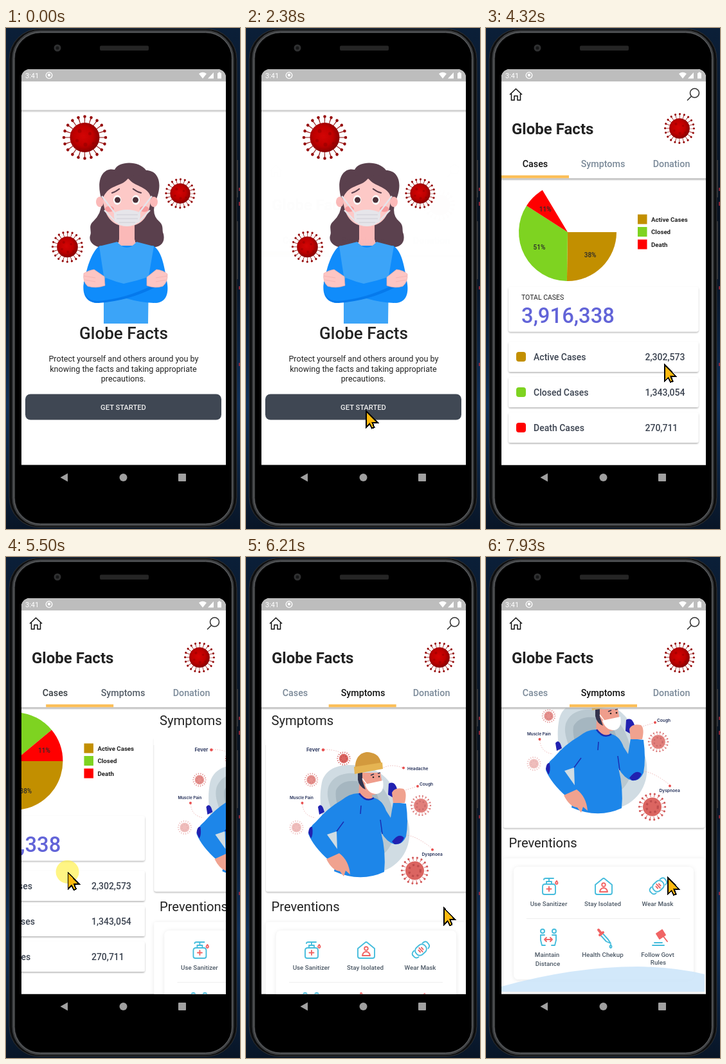
Animation of 364 by 778 pixels, one loop 8 s. Source, as an HTML page:

```html
<!DOCTYPE html>
<html lang="en">
<head>
<meta charset="utf-8">
<title>Health stats app</title>
<style>
html, body { margin: 0; width: 100%; height: 100%; overflow: hidden; background: #0a1b30; }
svg { display: block; width: 100vw; height: 100vh; }
text { font-family: Roboto, sans-serif; fill: #222; }
.mid { text-anchor: middle; }
.tab { font-size: 14.3px; font-weight: 500; text-anchor: middle; }
.legend { font-size: 9.7px; font-weight: 700; }
.share { font-size: 10px; font-weight: 500; text-anchor: middle; fill: #2b2b2b; }
.row text { font-size: 14px; font-weight: 500; fill: #3b4350; }
.card { fill: #fff; filter: url(#shade); }
.head { font-size: 20.2px; }
.tip text { font-size: 9.8px; font-weight: 500; fill: #4d5966; text-anchor: middle; }
.note text { font: 600 6.6px Inter, sans-serif; fill: #1f2b55; }
.icon { fill: none; stroke: #45bcdc; stroke-width: 1.9; stroke-linecap: round; stroke-linejoin: round; }
.icon .hot { stroke: #f06464; }
</style>
</head>
<body>
<svg viewBox="0 0 364 778" preserveAspectRatio="none">
<defs>
  <linearGradient id="desk" x2="0" y2="1">
    <stop stop-color="#0b1f38"/><stop offset=".45" stop-color="#07101d"/><stop offset=".75" stop-color="#10315a"/><stop offset="1" stop-color="#081526"/>
  </linearGradient>
  <linearGradient id="drop" x2="0" y2="1">
    <stop stop-color="#aaa"/><stop offset="1" stop-color="#aaa" stop-opacity="0"/>
  </linearGradient>
  <radialGradient id="ball" cx=".45" cy=".45" r=".6">
    <stop stop-color="#d40404"/><stop offset=".55" stop-color="#bf0000"/><stop offset="1" stop-color="#7c0000"/>
  </radialGradient>
  <filter id="shade" x="-10%" y="-10%" width="120%" height="130%">
    <feDropShadow dx="0" dy="1.5" stdDeviation="1.3" flood-opacity=".3"/>
  </filter>
  <filter id="soft" x="-10%" y="-10%" width="120%" height="120%">
    <feDropShadow dx="0" dy="1" stdDeviation="3" flood-opacity=".1"/>
  </filter>
  <clipPath id="screen"><path d="M24 678.500V77a13 13 0 0 1 13-13H329a13 13 0 0 1 13 13V678.500Z"/></clipPath>
  <clipPath id="body"><path d="M24 234H342V679H24Z"/></clipPath>
  <g id="virus" fill="none">
    <circle r="27" stroke="#8f0a0a" stroke-width="10" pathLength="20" stroke-dasharray=".13 .87" stroke-dashoffset=".065"/>
    <circle r="32.500" stroke="#960a0a" stroke-width="4.600" stroke-linecap="round" pathLength="20" stroke-dasharray=".001 .999"/>
    <circle r="23" fill="url(#ball)"/>
    <g fill="#7a0000" opacity=".35"><circle cx="-8" cy="-10" r="3"/><circle cx="8" cy="-6" r="2.500"/><circle cx="-12" cy="5" r="2.500"/><circle cx="1" cy="11" r="3"/><circle cx="13" cy="9" r="2"/></g>
  </g>
  <g id="pale">
    <circle r="28" fill="none" stroke="#cf4b4b" stroke-width="8" pathLength="18" stroke-dasharray=".14 .86" stroke-dashoffset=".07"/>
    <circle r="32" fill="none" stroke="#cf4b4b" stroke-width="5" stroke-linecap="round" pathLength="18" stroke-dasharray=".001 .999"/>
    <circle r="23" fill="#d85550"/>
    <circle r="14" fill="none" stroke="#b83a3a" stroke-width="5" stroke-dasharray="5 7"/>
  </g>
</defs>

<!-- phone -->
<rect width="364" height="778" fill="url(#desk)"/>
<path d="M363 248v5m0 17v6m0 125v5m0 114v5" stroke="#b52b38" stroke-width="1.5"/>
<path d="M359.500 205v58M359.500 300v90" stroke="#34363a" stroke-width="3"/>
<rect x="5" y="1.500" width="354" height="774" rx="47" fill="#0d0e0f" stroke="#303235"/>
<rect x="11.500" y="5.500" width="341" height="766" rx="42" fill="none" stroke="#3c3e40" stroke-width="4"/>
<rect x="12.500" y="6.500" width="339" height="764" rx="41" fill="none" stroke="#66686b"/>
<rect x="15" y="8.500" width="336" height="760" rx="39" fill="#000"/>
<circle cx="80" cy="31" r="5.500" fill="#2f3031"/><circle cx="80" cy="31" r="2.500" fill="#151617"/>
<rect x="146" y="27.500" width="76" height="7.500" rx="2" fill="#252525"/>
<g fill="#a0a0a0"><path d="M84.500 698L96 691.500V704.500Z"/><circle cx="182.500" cy="698" r="6"/><rect x="268" y="692" width="12" height="12" rx="1"/></g>

<g clip-path="url(#screen)">
  <rect x="24" y="64" width="318" height="615" fill="#fff"/>

  <!-- welcome page -->
  <rect x="24" y="127.500" width="318" height="4" fill="url(#drop)" opacity=".8"/>
  <use href="#virus" transform="translate(122.500 170)"/>
  <use href="#virus" transform="translate(271 257) scale(.68)"/>
  <use href="#virus" transform="translate(95.500 340) scale(.71)"/>
  <path fill="#5a404d" d="M148 264C140 236 150 216 169 220C176 206 207 206 218 221C236 221 245 240 233 268Q225 290 239 301C246 308 242 314 245 320C248 334 240 341 224 341L205 333L172 333L152 341C136 341 128 331 131 322C134 315 127 308 136 300Q151 286 148 264Z"/>
  <g fill="#fbb9b8">
    <path d="M176 295H200V328Q205 340 188 341Q172 340 176 328Z"/>
    <ellipse cx="146" cy="270" rx="6" ry="8"/><ellipse cx="230" cy="270" rx="6" ry="8"/>
  </g>
  <path fill="#fdc9c7" d="M151 258C152 240 170 243 190 234C204 242 222 238 225 258C226 290 212 308 188 308C164 308 150 290 151 258Z"/>
  <path fill="#5a404d" d="M150 266C147 230 175 222 190 233C182 247 158 242 150 266ZM190 233C205 222 230 232 226 266C222 244 200 248 190 233Z"/>
  <g fill="#f79a9c"><ellipse cx="161" cy="281" rx="7" ry="4.500"/><ellipse cx="215" cy="281" rx="7" ry="4.500"/></g>
  <g fill="#fff"><ellipse cx="173" cy="267" rx="6" ry="7.500"/><ellipse cx="202" cy="267" rx="6" ry="7.500"/></g>
  <g fill="#4a3038"><circle cx="173.500" cy="267" r="4.500"/><circle cx="201.500" cy="267" r="4.500"/></g>
  <path d="M165 256Q171 254 176 250M198 250Q203 254 210 256" fill="none" stroke="#5a404d" stroke-width="2.200" stroke-linecap="round"/>
  <path d="M149 261L169 287M227 261L207 287M153 283L172 302M224 283L205 302" stroke="#e4e4ea" stroke-width="2.400"/>
  <path fill="#e6e5ea" d="M168 287Q188 277 209 287Q211 307 188 308Q166 307 168 287Z"/>
  <path d="M172 290H205M172 296H205M176 302H201" stroke="#cdccd4"/>
  <path fill="#0f8cfb" d="M146 338C134 346 126 370 122 392C117 412 124 426 141 427L188 418L233 427C250 426 254 411 250 392C246 368 242 346 229 338Z"/>
  <path fill="#3ba4f8" d="M145 339L173 332Q188 350 203 332L230 339L222 385L221 459H152L152 385Z"/>
  <path fill="#0f8cfb" d="M250 396Q254 424 230 427Q185 425 147 402L155 388Q190 402 226 404Z"/>
  <path fill="#0579ec" d="M122 398Q119 427 144 427Q190 424 231 403L221 390Q185 401 147 404Z"/>
  <path fill="#0f8cfb" d="M121 394Q118 423 142 424Q185 421 229 399L220 387Q185 399 147 402Z"/>
  <g fill="#fdc5c3" stroke="#eea9a8" stroke-width=".6">
    <path d="M153 386L137 375Q129 376 121 381Q119 394 127 401Q140 405 154 400Z"/>
    <path d="M219 387L234 375Q244 376 251 382Q252 394 244 401Q232 405 219 400Z"/>
    <path d="M121 385L139 388M122 391L139 394M251 385L233 388M250 391L233 394" fill="none"/>
  </g>
  <text class="mid" x="183" y="483" font-size="26" font-weight="500">Globe Facts</text>
  <g class="mid" font-size="12.600"><text x="183" y="518">Protect yourself and others around you by</text><text x="182.500" y="533.500">knowing the facts and taking appropriate</text><text x="182.500" y="549">precautions.</text></g>
  <rect x="30" y="568.500" width="305" height="40" rx="8" fill="#3f4753"/>
  <text class="mid" x="182.500" y="592.500" font-size="11.200" font-weight="500" style="fill:#eee">GET STARTED</text>

  <!-- statistics page -->
  <g id="stats">
    <rect x="24" y="64" width="318" height="615" fill="#fff"/>
    <circle id="spin" cx="182.500" cy="456.500" r="15" fill="none" stroke="#2196f3" stroke-width="3" pathLength="360"/>
    <g clip-path="url(#body)">
      <g id="cases">
        <g id="pie"></g>
        <g id="legend"></g>
        <rect class="card" x="35" y="402" width="295.500" height="69.500" rx="3"/>
        <text x="55" y="422" font-size="10.500">TOTAL CASES</text>
        <text x="55" y="457.500" font-size="32.800" font-weight="500" style="fill:#6264d8">3,916,338</text>
        <g id="rows" class="row"></g>
      </g>
      <g id="symptoms">
        <g id="scroll">
          <text class="head" x="39.500" y="261">Symptoms</text>
          <rect class="card" x="31" y="280" width="313" height="239.500" rx="3"/>
          <rect x="30" y="268" width="316" height="24" fill="#fff"/>
          <path fill="#d0dce3" d="M118 350C125 322 160 318 190 328C225 335 240 375 252 410C262 450 240 487 195 492C155 500 128 470 122 430C119 400 112 380 118 350Z"/>
          <path fill="#b9c8d0" d="M128 358C137 332 170 332 195 342C222 360 230 390 232 420C230 450 215 470 185 470C150 470 140 430 136 405C132 385 124 375 128 358Z"/>
          <path fill="#a5b6c0" d="M140 362C150 342 180 345 200 360C215 390 210 420 190 430C160 425 136 390 140 362Z"/>
          <path fill="#2121b0" d="M112 388Q118 380 122 396L114 400ZM222 352Q231 347 235 360L231 375L221 369Z"/>
          <path fill="#ef9d8c" d="M177 335H209L212 352Q207 371 196 369L197 380Q185 389 175 372Z"/>
          <path fill="#33344e" d="M174 330H181V347L186 361Q176 357 174 346Z"/>
          <path fill="#fff" d="M185 353L213 347Q216 366 203 368Q190 368 185 353Z"/>
          <path d="M181 344L190 356" stroke="#fff" stroke-width="1.500"/>
          <path d="M194 339l5-2M205 336l4-1" stroke="#33344e" stroke-width="1.800"/><circle cx="198" cy="342" r="1.300" fill="#222"/><circle cx="207" cy="341" r="1.300" fill="#222"/>
          <path fill="#d39a3d" d="M170 331C168 308 183 300 195 304Q210 307 211 326Z"/>
          <path fill="#e5b452" d="M168 326L212 319L213 329L169 337Z"/>
          <path fill="#1d86e9" d="M148 378Q163 366 176 367Q187 382 199 374Q212 377 218 394L225 405L229 381L249 383Q253 412 249 434Q243 448 231 446Q219 443 210 427Q218 458 215 489Q178 506 137 488Q141 470 142 456L141 426L126 431L148 462L129 471Q105 450 97 430Q98 420 109 411Q128 389 148 378Z"/>
          <path d="M176 367Q187 382 199 374" fill="none" stroke="#1a2db2" stroke-width="2.500"/>
          <path d="M141 426L152 411M212 430L209 408M178 399L179 386" stroke="#1a2db2" stroke-width="1.500"/>
          <path fill="#2121b0" d="M97 428Q98 418 103 419Q105 432 101 437ZM227 442Q238 427 246 436Q242 447 231 446Z"/>
          <path fill="#f0a28f" d="M229 382L227 366Q231 357 245 360Q251 365 247 382ZM125 469L145 460Q160 471 162 493L155 487L152 496L146 488Q134 487 125 469Z"/>
          <g fill="none" stroke="#e7a4a4" stroke-width=".8" stroke-dasharray="1.500 2"><path d="M122 299Q146 299 158 311M214 327Q226 321 243 327M245 363L267 356M88 384Q89 402 108 405M249 432Q265 433 290 453"/></g>
          <g fill="#e84f4f"><circle cx="120" cy="299.500" r="2.300"/><circle cx="245" cy="327.500" r="2"/><circle cx="267" cy="356" r="2"/><circle cx="87.500" cy="382" r="2"/><circle cx="290" cy="454.500" r="2"/></g>
          <g class="note"><text x="94" y="301.500" style="font-size:7.800px">Fever</text><text x="251" y="331">Headache</text><text x="270" y="355">Cough</text><text x="68" y="376" style="font-size:6.300px">Muscle Pain</text><text x="273.500" y="463.500">Dyspnoea</text></g>
          <use href="#pale" transform="translate(152 313) scale(.31)" opacity=".9"/>
          <use href="#pale" transform="translate(101.500 346) scale(.31)" opacity=".65"/>
          <use href="#pale" transform="translate(78.500 420) scale(.32)" opacity=".38"/>
          <use href="#pale" transform="translate(272 386) scale(.47)" opacity=".75"/>
          <use href="#pale" transform="translate(262.500 487) scale(.63)" opacity=".9"/>

          <text class="head" x="39.500" y="550">Preventions</text>
          <rect x="31" y="567" width="313" height="207" rx="4" fill="#fff" filter="url(#soft)"/>
          <rect x="47" y="580" width="280" height="175" rx="8" fill="#fff" filter="url(#soft)"/>
          <path d="M67 660.500H306" stroke="#eee"/>
          <path fill="#cfe6fa" opacity=".92" d="M28 766Q140 735 240 735Q300 736 344 747V774H28Z"/>
          <g class="icon">
            <g transform="translate(103 610)"><path d="M-11 1Q-11-3-7-3H5Q9-3 9 1V10Q9 13 6 13H-8Q-11 13-11 10ZM-5-3V-7H3V-3M-1-7V-12M-9-10Q-9-12-6-12H6"/><path class="hot" d="M-1 1V8M-4.500 4.500H2.500M11-8Q7-4 11-3Q14-4 11-8"/></g>
            <g transform="translate(187 610)"><path d="M-10 13Q-13 13-13 10V-2L-2-11Q0-13 2-11L13-2V10Q13 13 10 13Z"/><path class="hot" d="M-6 9Q-5 3 0 3Q5 3 6 9Z"/><circle class="hot" cy="-2" r="2.800"/></g>
            <g transform="translate(272 610) rotate(-42)"><rect x="-9" y="-7" width="18" height="14" rx="6"/><path d="M-9-6Q-16-6-15 0Q-15 6-10 6M9-6Q16-6 15 0Q15 6 10 6"/><path class="hot" d="M0-4V4M-3-2V2M3-2V2"/></g>
            <g transform="translate(101 689)"><circle cx="-9" cy="-9" r="3"/><circle cx="9" cy="-9" r="3"/><path d="M-6-3H-12V5L-10 13H-5M6-3H12V5L10 13H5"/><path class="hot" d="M-5 4H5M-3 1L-6 4L-3 7M3 1L6 4L3 7"/></g>
            <g transform="translate(190 689)"><path d="M-5-6L4 4L8 10L1 7L-8-3ZM8 12Q5 16 8 17Q11 16 8 12"/><path class="hot" d="M-4-7L-9-3M-7-6L-11-11" stroke-width="4"/></g>
            <g transform="translate(275 689)"><path d="M-12 13H6M-9 9H3"/><path class="hot" d="M-6-5L3-11L8-3L-1 3ZM4-2L11 7" fill="#f06464"/></g>
          </g>
          <g class="tip"><text x="101.500" y="641">Use Sanitizer</text><text x="185.500" y="641">Stay Isolated</text><text x="271" y="641">Wear Mask</text><text x="99" y="720">Maintain</text><text x="100" y="734">Distance</text><text x="185.500" y="720">Health Chekup</text><text x="271" y="720">Follow Govt</text><text x="272" y="731.500">Rules</text></g>
        </g>
      </g>
    </g>
    <rect x="24" y="82" width="318" height="152" fill="#fff"/>
    <rect x="24" y="233.500" width="318" height="4" fill="url(#drop)"/>
    <path d="M37 103.500L46.500 94.500L56 103.500M39.500 102V112H44V105.500H49V112H53.500V102" fill="none" stroke="#111" stroke-width="1.500"/>
    <g fill="none" stroke="#333" stroke-width="1.600"><circle cx="324.500" cy="101" r="7"/><path d="M319.500 106L313 112.500"/></g>
    <text x="40" y="164.500" font-size="24" font-weight="700">Globe Facts</text>
    <use href="#virus" transform="translate(301 156) scale(.69)"/>
    <text class="tab" x="76.500" y="216">Cases</text><text class="tab" x="182" y="216">Symptoms</text><text class="tab" x="288.500" y="216">Donation</text>
    <rect id="bar" x="24" y="228.800" width="105" height="4.400" fill="#fcbf58"/>
  </g>

  <!-- status bar -->
  <rect x="24" y="64" width="318" height="19" fill="#bdbdbd"/>
  <text x="30" y="77.500" font-size="11" style="fill:#fff">3:41</text>
  <circle cx="67" cy="73.500" r="4.800" fill="none" stroke="#fff" stroke-width="1.300"/><circle cx="67" cy="73" r="2.200" fill="#fff"/>
  <path fill="#fff" d="M300 71Q306 66.500 312 71L306 78.500ZM314 78.500L323 69V78.500ZM329 70H330.500V68.500H333.500V70H335V78.500H329Z"/>
</g>

<circle id="press" r="18" fill="#fff04a" opacity=".68"/>
<path id="cursor" d="M1 1V26.500L6.500 21L10 28L13.500 26.500L10.500 19H18.500Z" fill="#ffb90f" stroke="#000" stroke-width="1.900" shape-rendering="crispEdges"/>
</svg>
<script>
const LOOP = 8000, PAGE = 318;
const $ = id => document.getElementById(id);
const move = (id, x, y) => $(id).setAttribute('transform', `translate(${x} ${y})`);
const show = (id, on) => { $(id).style.display = on ? '' : 'none'; };
const clamp = v => Math.max(0, Math.min(1, v));
const smooth = v => v * v * (3 - 2 * v);

// Interpolates rows of [time, ...values].
function track(keys, t) {
  const i = keys.findIndex(k => k[0] > t);
  if (i < 0) return keys[keys.length - 1].slice(1);
  if (!i) return keys[0].slice(1);
  const a = keys[i - 1], b = keys[i], k = (t - a[0]) / (b[0] - a[0]);
  return a.slice(1).map((v, j) => v + (b[j + 1] - v) * k);
}

const pointer = [
  [600, 250, 716], [1000, 176, 612], [1220, 186, 594], [2380, 186, 594],
  [3170, 182, 302], [3320, 182, 302], [3500, 185, 246], [3900, 275, 543],
  [4320, 277, 522], [4870, 284, 530], [4950, 286, 530], [5180, 286, 530],
  [5260, 228, 515], [5500, 96, 489], [5600, 50, 485], [5700, 55, 500],
  [6050, 307, 544], [6210, 307, 544], [6420, 300, 590], [6830, 296, 525],
  [6950, 296, 545], [7500, 288, 500], [7780, 288, 500], [7930, 282, 497]
];
const swipe = [[5260, 0], [5500, 114], [5600, 170], [5750, 255], [5970, 306], [6210, 314], [6500, PAGE]];
const scrolling = [[6450, 0], [6830, 60], [6950, 60], [7500, 99]];
const presses = [[1680, 1830], [5230, 5600], [6430, 6820], [6960, 7440]];

const groups = [
  { name: 'Active Cases', row: 'Active Cases', count: '2,302,573', share: .38, color: '#c28f00' },
  { name: 'Closed', row: 'Closed Cases', count: '1,343,054', share: .51, color: '#7ed321' },
  { name: 'Death', row: 'Death Cases', count: '270,711', share: .11, color: '#ff0000' }
];
const each = make => groups.map(make).join('');
$('pie').innerHTML = each(g => `<path fill="${g.color}"/>`) + each(g => `<text class="share">${Math.round(g.share * 100)}%</text>`);
$('legend').innerHTML = each((g, i) => {
  const y = 289.5 + i * 19.5;
  return `<rect x="236" y="${y}" width="14.5" height="15" fill="${g.color}"/><text class="legend" x="257" y="${y + 11}">${g.name}</text>`;
});
$('rows').innerHTML = each((g, i) => {
  const y = 487 + i * 55;
  return `<rect class="card" x="35" y="${y}" width="295.5" height="47" rx="3"/>
    <rect x="47" y="${y + 16}" width="15" height="15" rx="4" fill="${g.color}"/>
    <text x="74" y="${y + 28.5}">${g.row}</text><text x="247.5" y="${y + 28.5}">${g.count}</text>`;
});
const slices = $('pie').querySelectorAll('path');
const shares = $('pie').querySelectorAll('text');
const tabs = document.querySelectorAll('.tab');

function drawPie(grown) {
  const at = (a, r) => [127 + r * Math.cos(a), 317 + r * Math.sin(a)];
  let from = 0;
  groups.forEach((g, i) => {
    const span = g.share * grown * Math.PI * 2, to = from + span;
    slices[i].setAttribute('d', `M127 317L${at(from, 76)}A76 76 0 ${+(span > Math.PI)} 1 ${at(to, 76)}Z`);
    const [x, y] = at(from + span / 2, 50);
    shares[i].setAttribute('x', x);
    shares[i].setAttribute('y', y + 3.5);
    from = to;
  });
}

function drawSpinner(t) {
  const turns = (t - 3320) / 1333 + .5, n = Math.floor(turns), u = turns - n;
  const head = 275 * smooth(clamp(2 * u)), tail = 275 * smooth(clamp(2 * u - 1));
  const angle = -100 + (t - 3320) * .25 + n * 275 + tail;
  $('spin').setAttribute('stroke-dasharray', `${head - tail + 8} 360`);
  $('spin').setAttribute('transform', `rotate(${angle} 182.5 456.5)`);
}

function tint(el, k) {
  const rgb = [123, 138, 153].map(c => c + (17 - c) * k);
  el.style.fill = `rgb(${rgb})`;
}

function draw(t) {
  const enter = clamp((t - 2380) / 300), loaded = t >= 4090;
  show('stats', t >= 2380);
  $('stats').style.opacity = enter;
  move('stats', 0, 120 * (1 - enter) ** 3);

  show('spin', !loaded);
  show('cases', loaded);
  show('symptoms', loaded);
  drawSpinner(t);
  drawPie(1 - (1 - clamp((t - 4090) / 800)) ** 3.2);

  const [offset] = track(swipe, t), page = offset / PAGE;
  move('cases', -offset, 0);
  move('symptoms', 314 - offset, 0);
  move('scroll', 0, -track(scrolling, t)[0]);
  move('bar', page * 106, 0);
  tint(tabs[0], 1 - page);
  tint(tabs[1], page);
  tint(tabs[2], 0);

  const [x, y] = track(pointer, t);
  show('cursor', t >= 600);
  show('press', presses.some(([a, b]) => t >= a && t < b));
  move('cursor', x, y);
  move('press', x, y);
}

function tick() {
  draw(performance.now() % LOOP);
  requestAnimationFrame(tick);
}
tick();
</script>
</body>
</html>
```
